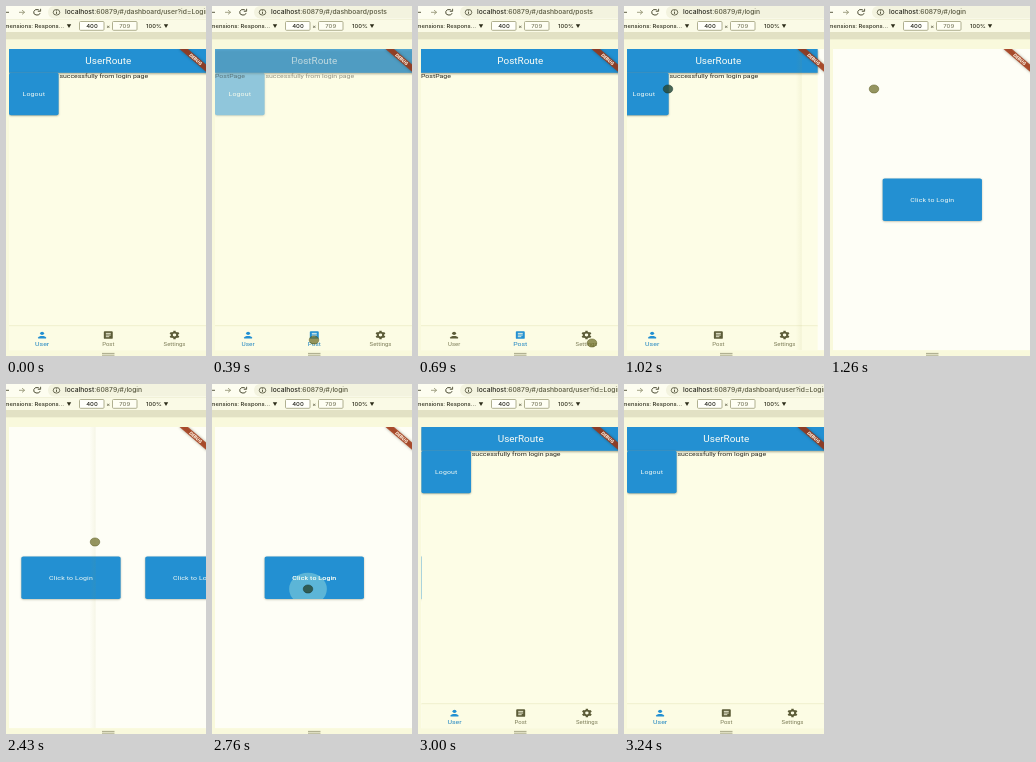
An HTML page with a canvas for the animation above (3.27 s loop, 200 by 350 pixels).

```html
<!DOCTYPE html>
<html lang="en">
<head>
<meta charset="utf-8">
<title>Login routing</title>
<style>
html, body { margin: 0; width: 200px; height: 350px; overflow: hidden; background: #fcfce8; }
canvas { display: block; width: 200px; height: 350px; }
</style>
</head>
<body>
<canvas id="stage"></canvas>
<script>
const LOOP = 3270, STEP = 30, SLIDE = 240;
const SX = 0.4965, SY = 0.425, X0 = 3, Y0 = 43; // logical phone units to stage
const W = 400, H = 709;
const BLUE = '#2390d2', PAGE = '#fdfde6', LOGIN_BG = '#fefef6';
const UI = 'Inter, Arial, sans-serif', APP = 'Roboto, Arial, sans-serif';
const TABS = [
  { label: 'User', title: 'UserRoute', path: 'dashboard/user?id=Login%20successfully' },
  { label: 'Post', title: 'PostRoute', path: 'dashboard/posts', body: 'PostPage' },
  { label: 'Settings', title: 'SettingsRoute', path: 'dashboard/settings', body: 'SettingsPage' }
];
const TAB_TIMES = [[0, 0], [330, 1], [720, 2], [870, 0]];
const LOGOUT = 1010, FOCUS = 1800, ERASE = 2040, TYPE = 2150, ENTER = 2372, ENTRY = 2790;
// pointer path: time, x, y
const PATH = [[150, 98, 260], [300, 102, 334], [420, 102, 334], [600, 174, 337], [735, 174, 337],
  [840, 38, 335], [885, 38, 335], [975, 44, 83], [1300, 44, 83], [1590, 89, 158],
  [2480, 89, 158], [2640, 96, 205], [2900, 96, 205]];
const PRESSES = [[300, 345], [700, 735], [840, 885], [975, 1030], [2670, 2800]];

const canvas = document.getElementById('stage');
const c = canvas.getContext('2d');
const dpr = Math.max(1, window.devicePixelRatio || 1);
canvas.width = 200 * dpr;
canvas.height = 350 * dpr;

const clamp = v => Math.min(1, Math.max(0, v));
const easeOut = v => 1 - Math.pow(1 - clamp(v), 3);
const smooth = v => v * v * (3 - 2 * v);

function rect(x, y, w, h, fill) {
  c.fillStyle = fill;
  c.fillRect(x, y, w, h);
}

function rounded(x, y, w, h, r, fill, stroke, line = 1) {
  c.beginPath();
  c.roundRect(x, y, w, h, r);
  if (fill) { c.fillStyle = fill; c.fill(); }
  if (stroke) { c.strokeStyle = stroke; c.lineWidth = line; c.stroke(); }
}

function oval(x, y, rx, ry, fill) {
  c.beginPath();
  c.ellipse(x, y, rx, ry, 0, 0, Math.PI * 2);
  c.fillStyle = fill;
  c.fill();
}

function text(s, x, y, size, color, align = 'left', font = APP, weight = 400) {
  c.font = `${weight} ${size}px ${font}`;
  c.fillStyle = color;
  c.textAlign = align;
  c.textBaseline = 'alphabetic';
  c.fillText(s, x, y + size * 0.36);
}

// text on the browser chrome, placed in stage pixels
function chromeText(s, x, y, size, color, align) {
  c.save();
  c.translate(x, y);
  c.scale(0.495, SY);
  text(s, 0, 0, size, color, align, UI, 500);
  const w = c.measureText(s).width * 0.495;
  c.restore();
  return w;
}

function line(points, color, width) {
  c.beginPath();
  points.forEach(([x, y]) => c.lineTo(x, y));
  c.strokeStyle = color;
  c.lineWidth = width;
  c.stroke();
}

function caretDown(x, y) {
  c.beginPath();
  c.moveTo(x - 2.2, y - 1.7);
  c.lineTo(x + 2.2, y - 1.7);
  c.lineTo(x, y + 1.9);
  c.fillStyle = '#2b2b18';
  c.fill();
}

function tabAt(t) {
  let i = 0;
  while (i + 1 < TAB_TIMES.length && t >= TAB_TIMES[i + 1][0]) i++;
  const now = TAB_TIMES[i], prev = TAB_TIMES[Math.max(0, i - 1)];
  return { now: now[1], prev: prev[1], mix: i ? clamp((t - now[0]) / 120) : 1 };
}

function pathAt(t) {
  if (t >= ENTRY) return TABS[0].path;
  if (t >= ERASE && t < ENTER) {
    if (t < TYPE) return 'login'.slice(0, 5 - Math.ceil(clamp((t - ERASE) / 100) * 5));
    return 'dashboard'.slice(0, Math.ceil((t - TYPE) / 18));
  }
  if (t >= LOGOUT) return 'login';
  return TABS[tabAt(t).now].path;
}

function addressBar(t) {
  const focus = t >= FOCUS && t < ENTER;
  rect(0, 0, 200, 13, '#fdfdf0');
  if (focus) rounded(42, 0.4, 180, 12.2, 6, '#fffffa', '#2f74b8', 1.3);
  else rounded(42, 0, 180, 12.6, 6, '#f3f3df');
  const ink = '#4c4c34';
  line([[-3, 6.3], [3, 6.3]], ink, 0.9);
  line([[13, 6.3], [18.5, 6.3]], '#99997a', 0.9);
  line([[16, 4.2], [18.7, 6.3], [16, 8.4]], '#99997a', 0.9);
  c.beginPath();
  c.ellipse(31, 6.3, 3.3, 2.8, 0, 0.3, 5.5);
  c.strokeStyle = ink;
  c.lineWidth = 1;
  c.stroke();
  line([[34.6, 2.8], [34.6, 5.3], [31.8, 5.3]], ink, 0.9);
  c.beginPath();
  c.ellipse(50.5, 6.3, 3.3, 2.8, 0, 0, Math.PI * 2);
  c.lineWidth = 0.8;
  c.stroke();
  line([[50.5, 5.8], [50.5, 7.9]], ink, 0.9);
  rect(50, 4.4, 1, 0.8, ink);

  let x = 59;
  x += chromeText('localhost', x, 6.3, 13.6, '#24241a');
  x += chromeText(':60879/#/' + pathAt(t), x, 6.3, 13.6, focus ? '#33332a' : '#55553c');
  if (focus) rect(x + 0.3, 2.2, 0.8, 8, '#222');
}

function deviceBar() {
  rect(0, 13, 200, 13, '#fafae6');
  rect(0, 13, 200, 0.5, '#e6e6c8');
  chromeText('Dimensions: Respons…', 58, 20, 11.8, '#2b2b1a', 'right');
  caretDown(63, 20);
  rounded(73.5, 15.5, 24.5, 8.8, 1, '#fffffa', '#a8a886', 0.9);
  chromeText('400', 86, 20, 12, '#1c1c14', 'center');
  chromeText('×', 102.2, 20, 12, '#55553c', 'center');
  rounded(106.5, 15.5, 24.5, 8.8, 1, '#fefef3', '#a8a886', 0.9);
  chromeText('709', 118.7, 20, 12, '#7d7d62', 'center');
  chromeText('100%', 140, 20, 11.8, '#2b2b1a');
  caretDown(160, 20);
  rect(0, 26, 200, 7.5, '#e2e1c4');
  rect(0, 33.5, 200, 316.5, '#f9f9dc');
  rect(96, 346.9, 12.5, 0.9, '#a0a080');
  rect(96, 348.7, 12.5, 0.9, '#a0a080');
}

function buttonLabel(label, x, y) {
  c.letterSpacing = '0.3px';
  text(label, x, y, 14, '#f4faf4', 'center');
  c.letterSpacing = '0px';
}

function button(x, y, w, h, label) {
  c.save();
  c.shadowColor = 'rgba(60,60,20,.4)';
  c.shadowBlur = 2 * dpr;
  c.shadowOffsetY = 0.6 * dpr;
  rounded(x, y, w, h, 4, BLUE);
  c.restore();
  buttonLabel(label, x + w / 2, y + h / 2);
}

function icon(i, x, y, color) {
  c.save();
  c.translate(x, y);
  c.fillStyle = c.strokeStyle = color;
  if (i === 0) {
    oval(0, -4, 4, 4, color);
    c.beginPath();
    c.moveTo(-8, 8);
    c.lineTo(-8, 6);
    c.bezierCurveTo(-8, 0.7, 8, 0.7, 8, 6);
    c.lineTo(8, 8);
    c.fill();
  } else if (i === 1) {
    rounded(-9, -9, 18, 18, 2, color);
    [[-5, 10], [-1, 10], [3, 7]].forEach(([v, w]) => rect(-5, v, w, 2, PAGE));
  } else {
    c.lineWidth = 4;
    c.beginPath();
    c.arc(0, 0, 5.5, 0, Math.PI * 2);
    c.stroke();
    for (let k = 0; k < 6; k++) {
      c.fillRect(-2.4, -10, 4.8, 4);
      c.rotate(Math.PI / 3);
    }
  }
  c.restore();
}

function tabBody(i) {
  const tab = TABS[i];
  rect(0, 0, W, H - 56, PAGE);
  c.save();
  c.shadowColor = 'rgba(50,50,20,.4)';
  c.shadowBlur = 2 * dpr;
  c.shadowOffsetY = 0.7 * dpr;
  rect(0, 0, W, 56, BLUE);
  c.restore();
  text(tab.title, W / 2, 28, 20, '#fbfdf5', 'center');
  if (i === 0) {
    button(0, 56, 100, 100, 'Logout');
    text('successfully from login page', 101.5, 64.2, 14, '#22221a');
  } else {
    text(tab.body, 0, 64.2, 14, '#22221a');
  }
}

function dashboard(t) {
  const { now, prev, mix } = t >= ENTRY ? { now: 0, prev: 0, mix: 1 } : tabAt(t);
  if (mix < 1) tabBody(prev);
  c.globalAlpha = mix;
  tabBody(now);
  c.globalAlpha = 1;
  rect(0, H - 59, W, 3, '#efefcb');
  rect(0, H - 56, W, 56, '#fcfce4');
  TABS.forEach((tab, i) => {
    const x = W * (i + 0.5) / 3;
    const on = i === now ? mix : i === prev ? 1 - mix : 0;
    const color = on >= 0.5 ? BLUE : '#5c5c38';
    icon(i, x, H - 36, color);
    text(tab.label, x, H - 15.5, 12 + 2 * on, on >= 0.5 ? '#2186c2' : '#7d7d58', 'center');
  });
}

// the login page has no background of its own
function login(t, ripple) {
  const x = 100, y = (H - 100) / 2;
  button(x, y, 200, 100, 'Click to Login');
  if (ripple && t > 2670) {
    const k = (t - 2670) / 90;
    c.save();
    c.beginPath();
    c.roundRect(x, y, 200, 100, 4);
    c.clip();
    oval((96 - X0) / SX, (205 - Y0) / SY, 14 + 24 * k, 14 + 24 * k,
      `rgba(150,220,222,${0.5 * clamp(2.2 - k * 0.7)})`);
    c.restore();
    buttonLabel('Click to Login', W / 2, H / 2);
  }
}

function place(x, draw) {
  c.save();
  c.translate(x, 0);
  draw();
  c.restore();
}

// the old page drifts left by a third while the new one comes in from the right
function slide(p, from, to) {
  if (p < 1) place(-W * p / 3, from);
  const x = W * (1 - p);
  if (p > 0 && p < 1) {
    const g = c.createLinearGradient(x - 12, 0, x, 0);
    g.addColorStop(0, 'rgba(150,150,50,0)');
    g.addColorStop(1, 'rgba(150,150,50,.08)');
    rect(x - 12, 0, 12, H, g);
  }
  if (p > 0) place(x, to);
}

function banner() {
  c.save();
  c.translate(W, 0);
  c.rotate(Math.PI / 4);
  c.save();
  c.shadowColor = 'rgba(40,30,0,.5)';
  c.shadowBlur = 3 * dpr;
  rect(-40, 28, 80, 12, 'rgba(165,50,15,.8)');
  c.restore();
  text('DEBUG', 0, 34, 10.2, '#fff4e4', 'center', APP, 900);
  c.restore();
}

function phone(t) {
  c.save();
  c.translate(X0, Y0);
  c.scale(SX, SY);
  c.beginPath();
  c.rect(0, 0, W, H);
  c.clip();
  rect(0, 0, W, H, LOGIN_BG);
  const board = () => dashboard(t), entry = () => login(t, false), pressed = () => login(t, true);
  const p = start => easeOut((t - start) / SLIDE);
  if (t < LOGOUT) board();
  else if (t < ENTER) slide(p(LOGOUT), board, entry);
  else if (t < ENTRY) slide(p(ENTER), entry, pressed);
  else slide(p(ENTRY), pressed, board);
  banner();
  c.restore();
}

function pointer(t) {
  if (t < PATH[0][0] || t >= PATH[PATH.length - 1][0]) return;
  const i = PATH.findIndex(p => t < p[0]);
  const [t0, x0, y0] = PATH[i - 1], [t1, x1, y1] = PATH[i];
  const k = smooth((t - t0) / (t1 - t0));
  const x = x0 + (x1 - x0) * k, y = y0 + (y1 - y0) * k;
  const down = PRESSES.some(([a, b]) => t >= a && t < b);
  oval(x, y, 4.8, 4.1, down ? 'rgba(40,75,60,.85)' : 'rgba(108,108,38,.72)');
  c.strokeStyle = down ? 'rgba(25,55,50,.6)' : 'rgba(80,80,25,.55)';
  c.lineWidth = 0.8;
  c.stroke();
}

function draw(t) {
  c.setTransform(dpr, 0, 0, dpr, 0, 0);
  addressBar(t);
  deviceBar();
  phone(t);
  pointer(t);
}

const begin = performance.now();

function tick() {
  const elapsed = performance.now() - begin;
  draw(Math.floor(elapsed % LOOP / STEP) * STEP);
  requestAnimationFrame(tick);
}
tick();
</script>
</body>
</html>
```
